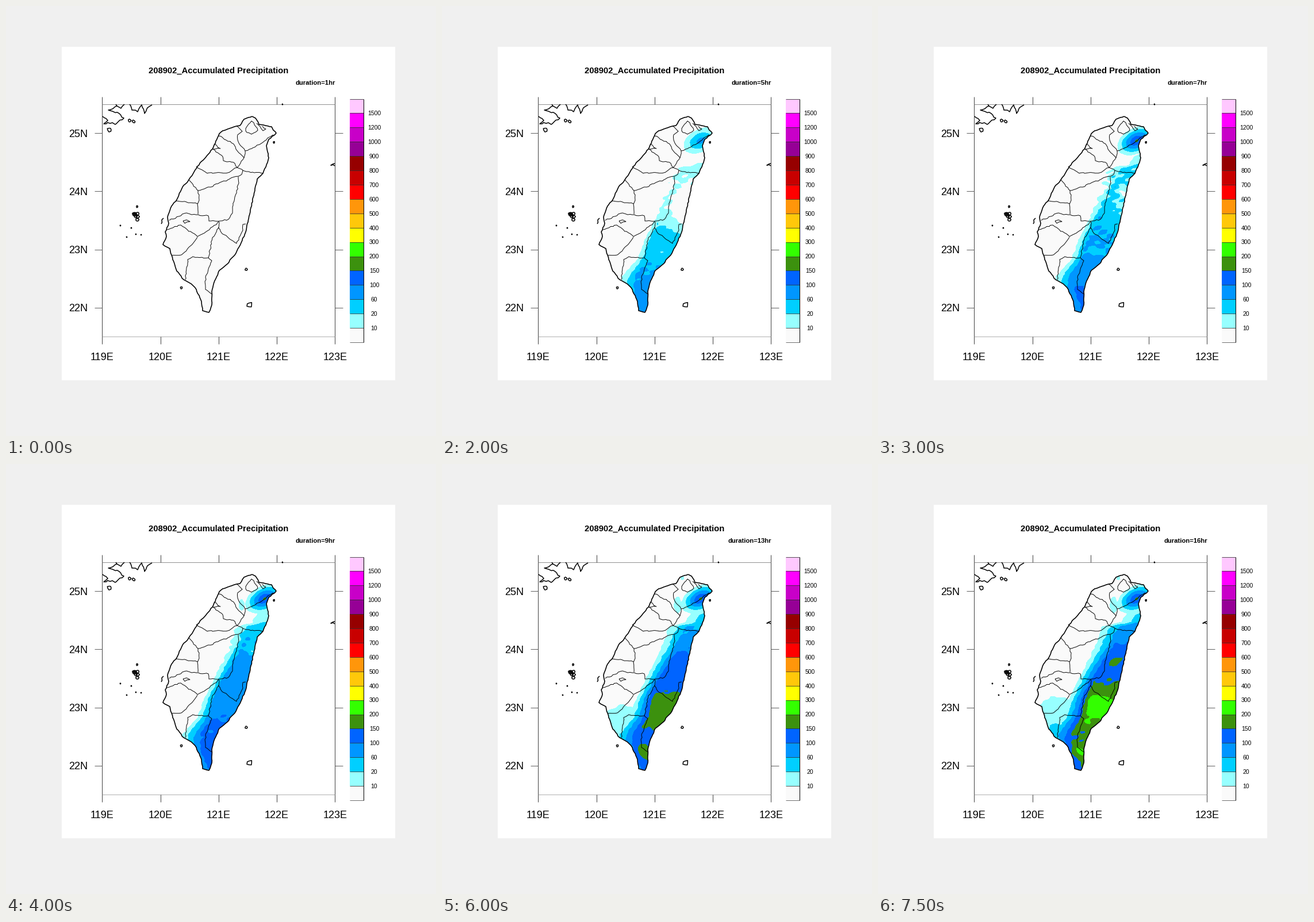
A matplotlib script for the animation above (8000 ms loop, 748 by 748 pixels).

```python
import numpy as np
import matplotlib.pyplot as plt
from matplotlib.animation import FuncAnimation
from matplotlib.patches import Polygon, Rectangle

SIZE, DPI = 748, 100
PX = 72 / DPI
HOURS = 16
COLORS = ["#fafafa", "#97ffff", "#00cfff", "#0096ff", "#0064ff", "#3c910e",
          "#33ff00", "#ffff00", "#ffc80a", "#ff960a", "#ff0000", "#c80000",
          "#960000", "#960096", "#c800c8", "#ff00ff", "#ffc8ff"]
LIMITS = [10, 20, 60, 100, 150, *range(200, 1001, 100)]
LIMITS += [1200, 1500]

rng = np.random.default_rng(4)
fig = plt.figure(figsize=(SIZE / DPI, SIZE / DPI), dpi=DPI, facecolor="#f0f0f0")
ax = fig.add_axes([0, 0, 1, 1])


def rect(x, y, w, h, color, z=1):
    ax.add_patch(Rectangle((x, y), w, h, fc=color, ec="none", zorder=z))


def line(xs, ys, width=1.0, color="black"):
    ax.plot(xs, ys, color=color, lw=width * PX, zorder=6,
            solid_capstyle="butt", solid_joinstyle="round")


def label(x, y, text, size, ha="center", weight="normal"):
    return ax.text(x, y, text, fontsize=size * PX, ha=ha, va="baseline",
                   family="Liberation Sans", weight=weight, zorder=8)


def rough(nums, amp, step=3.5):
    """Polyline through key points, with shaken points in between."""
    pts = np.reshape(np.array(nums, float), (-1, 2))
    out = [pts[0]]
    for a, b in zip(pts[:-1], pts[1:]):
        n = max(1, int(np.hypot(*(b - a)) / step))
        for k in range(1, n + 1):
            shake = rng.uniform(-amp, amp, 2) if k < n else 0
            out.append(a + (b - a) * k / n + shake)
    return np.array(out)


def county(*nums):
    line(*rough(nums, 1.1).T, width=0.95)


def shore(*nums):
    line(*rough(nums, 1.3).T, width=1.5)


def islet(x, y, r):
    a = np.linspace(0, 2 * np.pi, 8)
    d = r * rng.uniform(0.7, 1.3, 8)
    d[-1] = d[0]
    line(x + d * np.cos(a), y + d * np.sin(a), 1.5)


# Page, frame and axis labels
rect(97, 71, 580, 580, "white", 0)
LEFT, RIGHT, TOP, BOTTOM, DEGREE = 167.5, 572.3, 170.5, 575.3, 101.2
line([LEFT, RIGHT], [TOP, TOP], 1, "#909090")
line([LEFT, RIGHT], [BOTTOM, BOTTOM], 1, "#b0b0b0")
for x in (LEFT, RIGHT):
    line([x, x], [TOP, BOTTOM], 1, "#404040")
for i in range(5):
    x = LEFT + DEGREE * i
    for y in (TOP - 13, BOTTOM):
        line([x, x], [y, y + 13], 1, "#404040")
    label(x, 615.5, f"{119 + i}E", 18)
for i in range(4):
    y = TOP + DEGREE * (i + 0.5)
    for x in (LEFT - 13.5, RIGHT):
        line([x, x + 13.5], [y, y], 1, "#606060")
    label(142.5, y + 6.4, f"{25 - i}N", 18, "right")
label(370, 116.5, "208902_Accumulated Precipitation", 14.8, weight="bold")
clock = label(573, 136.5, "", 11.2, "right", "bold")

# Colour bar
STEP = 423.5 / len(COLORS)
for i, color in enumerate(COLORS):
    y = 585 - STEP * (i + 1)
    rect(598, y, 24.5, STEP, color)
    line([598, 622.5], [y, y], 0.8, "#303030")
    if i < len(LIMITS):
        label(640.5, y + 3.8, str(LIMITS[i]), 10.4)
line([598, 622.5], [585, 585], 0.9, "#606060")
line([622.5, 622.5], [161.5, 585], 1)

# Island outline
EAST = [428, 192, 434, 195, 440, 206, 462, 210, 465, 216, 470, 221, 457, 232,
        453, 243, 457, 264, 455, 272, 447, 291, 437, 301, 433, 318, 424, 362,
        417, 393, 409, 412, 400, 430, 392, 439, 386, 448, 371, 460, 363, 478,
        358, 497, 358, 520, 353, 533]
WEST = [342, 530, 340, 514, 331, 493, 325, 486, 309, 476, 297, 461, 290, 441,
        285, 422, 273, 415, 279, 401, 277, 393, 283, 378, 281, 367, 288, 348,
        297, 337, 307, 315, 317, 304, 333, 279, 359, 249, 371, 222, 377, 217,
        397, 210, 407, 208, 414, 197, 428, 192]
coast = rough(EAST + WEST, 0.6)
land = Polygon(coast, fc=COLORS[0], ec="none", zorder=1)
ax.add_patch(land)
line(*coast.T, width=1.6)

# County borders
county(402, 209, 411, 218, 403, 224, 404, 236, 416, 252, 441, 241, 465, 224)
county(427, 200, 417, 213, 419, 220, 427, 223, 438, 216, 431, 203, 427, 200)
county(436, 204, 447, 217, 452, 214, 446, 209)
county(370, 226, 396, 240, 400, 249, 414, 264)
county(362, 240, 373, 248, 360, 249, 377, 262, 378, 269, 396, 272, 402, 281)
county(416, 252, 414, 264, 402, 281, 418, 288, 447, 291)
county(331, 279, 350, 291, 386, 290, 402, 281)
county(318, 302, 334, 321, 356, 315, 362, 311, 410, 293, 412, 286)
county(334, 321, 336, 338, 333, 345, 334, 362)
county(295, 339, 333, 344)
county(284, 373, 314, 360, 323, 363, 352, 365, 353, 374, 372, 374)
county(404, 297, 405, 308, 394, 350, 394, 360, 387, 371, 372, 374)
county(308, 374, 314, 372, 320, 375, 311, 378, 308, 374)
county(280, 389, 304, 381, 333, 401, 345, 395, 371, 375)
county(288, 434, 305, 433, 326, 412, 333, 402)
county(371, 376, 370, 386, 359, 403, 352, 438)
county(312, 476, 316, 441, 325, 436, 352, 438, 358, 443, 347, 472, 347, 493, 358, 501)
county(369, 385, 376, 396, 401, 413, 412, 390, 412, 380, 417, 379)

# Mainland shore and small islands
shore(168, 192, 177, 199, 170, 205, 185, 203, 190, 206, 205, 195, 197, 187,
      178, 181, 193, 174, 191, 171)
shore(193, 174, 200, 178, 206, 171)
shore(215, 171, 219, 181, 229, 184, 236, 172, 241, 187, 246, 177, 254, 172)
shore(270, 379, 271, 372, 274, 369)
shore(572, 274, 565, 277, 572, 278)
for x, y, r in [(215, 199, 2.5), (222, 201, 2.5), (180, 215, 3.5), (228, 349, 1.5),
                (305, 490, 1.8), (418, 458, 2.3), (424, 520, 4.2), (466, 237, 1.5)]:
    islet(x, y, r)
for x, y in rng.normal((226, 364), (5, 3.5), (7, 2)):
    islet(x, y, 2.6)
for x, y in [(199, 382), (218, 386), (210, 402), (226, 397), (235, 398), (481, 171)]:
    islet(x, y, 0.7)

# Rain model: the value is an index into COLORS
X, Y = np.meshgrid(np.arange(265, 480, 2.5), np.arange(185, 540, 2.5))
STREAKS = np.sin(0.21 * X + 1.3 * np.sin(0.13 * Y)) * np.sin(0.37 * Y + 0.05 * X)
FRONT = np.interp(Y, [268, 283, 320, 375, 410, 440, 470, 500],
                  [470, 403, 390, 362, 345, 334, 308, 300])
GAP = 7 + 6 * ((Y - 395) / 100) ** 2
EARLY = np.interp(Y, [290, 350, 410, 500], [1.5, 1.2, 2.6, 3.3])


def bell(v, mid, width):
    return np.exp(-((v - mid) / width) ** 2)


LATE = (4.75 + 1.6 * bell(Y, 425, 32) + bell(Y, 505, 20)
        - 1.5 * np.clip((335 - Y) / 45, 0, 1))
# x, y, radii, amount before and after, hours of the change
BUMPS = [(428, 350, 22, 36, -2.5, 0, 5, 8.5),
         (427, 324, 8, 9, -1.6, 0, 8, 13),
         (384, 410, 12, 6, 0, 0.9, 8, 15),
         (413, 343, 10, 8, 0, 0.6, 10, 16),
         (367, 452, 7, 7, 0, 0.5, 6, 11),
         (380, 428, 12, 5, -0.8, 0, 7, 12),
         (347, 500, 10, 8, 0, 0.8, 6, 16)]
# x, y, radii, slant, peak, hours of growth
CONES = [(450, 234, 33, 23, 0.3, 5.4, 1, 7),
         (450, 268, 28, 20, 0.6, 2.4, 2, 11),
         (410, 245, 6, 14, 0, 1.7, 4, 10),
         (418, 198, 3, 3, 0, 1.5, 6, 13),
         (315, 478, 60, 72, 0, 2.6, 4, 16)]


def grow(hour, start, end):
    return np.clip((hour - start) / (end - start), 0, 1)


def rain(hour):
    u = grow(hour, 5, HOURS)
    core = bell(Y, 425, 40)
    ease = core * u * u * (3 - 2 * u) + (1 - core) * np.sqrt(u)
    cap = EARLY * grow(hour, 1, 5) ** 0.7 + (LATE - EARLY) * ease
    field = np.minimum(1 + (X - FRONT + 1.8 * (hour - 9)) / GAP, cap)
    showers = 0.8 * bell(Y, 315, 35) * bell(hour, 6, 2.5)
    field += (0.18 + showers) * STREAKS * grow(hour, 1, 4)
    for x, y, rx, ry, before, after, start, end in BUMPS:
        amount = before + (after - before) * grow(hour, start, end)
        field += amount * bell(X, x, rx) * bell(Y, y, ry)
    for x, y, rx, ry, slant, peak, start, end in CONES:
        r = np.hypot((X - x) / rx, (Y - y + slant * (X - x)) / ry)
        cone = grow(hour, start, end) * (peak - (peak - 1) * r)
        field = np.maximum(field, cone + 0.08 * STREAKS * (cone > 0))
    return np.clip(field, 0, 7.9)


layers = []


def update(i):
    hour = i + 1
    clock.set_text(f"duration={hour}hr")
    while layers:
        layers.pop().remove()
    field = rain(hour)
    if field.max() > 1:
        fill = ax.contourf(X, Y, field, levels=range(1, 9), colors=COLORS[1:8], zorder=2)
        fill.set_clip_path(land)
        layers.append(fill)
    ax.set(xlim=(0, SIZE), ylim=(SIZE, 0))
    return layers


ax.set(xlim=(0, SIZE), ylim=(SIZE, 0))
ax.axis("off")
anim = FuncAnimation(fig, update, frames=HOURS, interval=500, repeat=True, repeat_delay=0)
plt.show()
```
